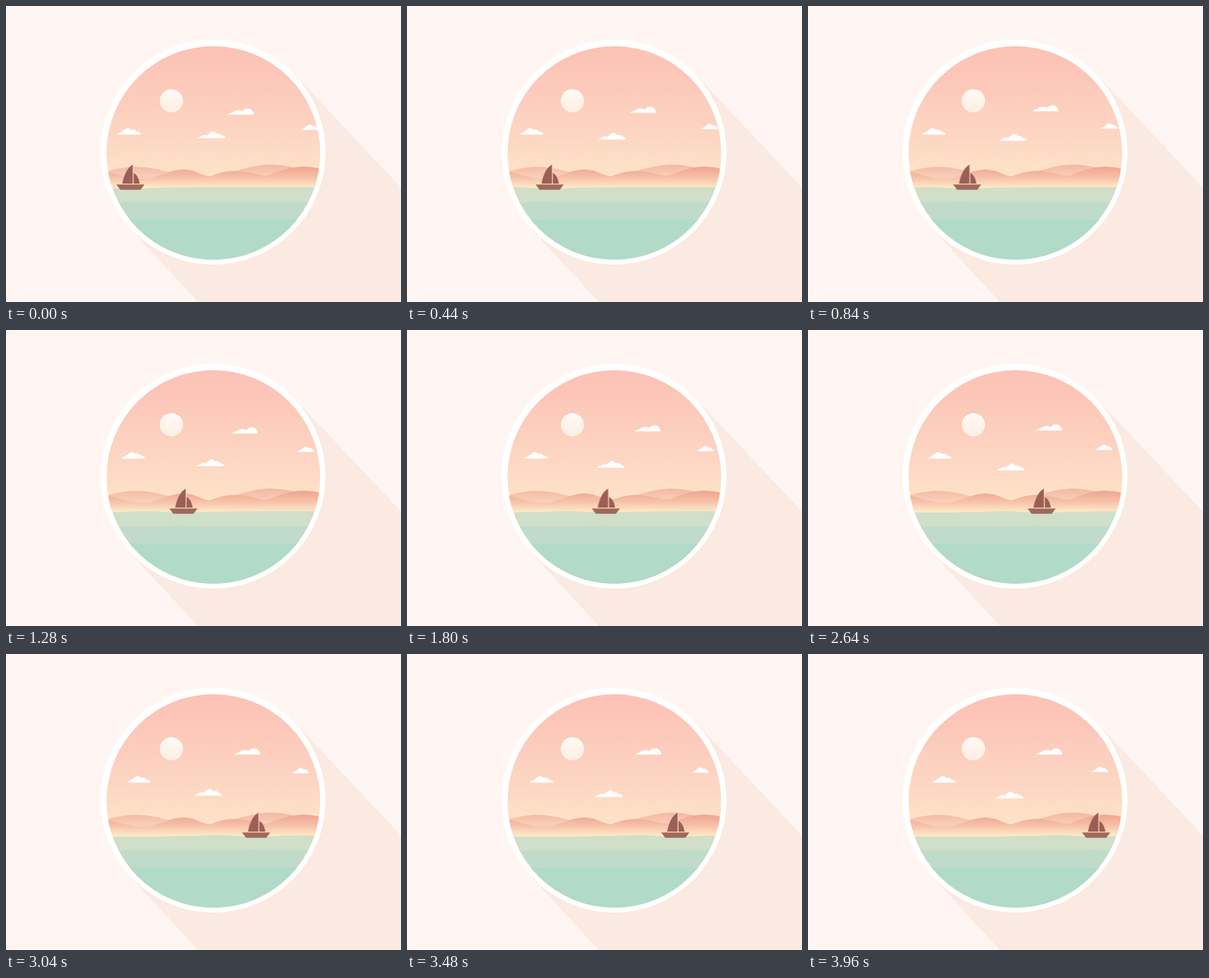
An HTML page without scripts that plays this animation: 560x420 px, repeating every 4 s.

```html
<!DOCTYPE html>
<html lang="en">
<head>
<meta charset="utf-8">
<title>Sailing at sunset</title>
<style>
  html, body { margin: 0; width: 100%; height: 100%; overflow: hidden; background: #fff6f3; }
  svg { display: block; width: 100vw; height: 100vh; }
  .drift { animation: drift 4s linear infinite; }
  .rise { animation-name: rise; }
  .boat, .waves { --x: 234.4px; --y: 0px; }
  .west { --x: 18.6px; --y: 0px; }
  .middle { --x: -6.2px; --y: 17.6px; }
  .high { --x: 9.2px; --y: -11.6px; }
  .east { --x: -17px; --y: -8.4px; }
  @keyframes drift { to { transform: translate(var(--x), var(--y)); } }
  /* the high cloud settles halfway through */
  @keyframes rise { 50%, 100% { transform: translate(var(--x), var(--y)); } }
</style>
</head>
<body>
<svg viewBox="0 0 560 420">
  <defs>
    <linearGradient id="sky" gradientUnits="userSpaceOnUse" x1="0" y1="57" x2="0" y2="258">
      <stop offset="0" stop-color="#fcc2b6"/>
      <stop offset=".2" stop-color="#fcc6b8"/>
      <stop offset=".65" stop-color="#fdd7c3"/>
      <stop offset="1" stop-color="#fee7c9"/>
    </linearGradient>
    <linearGradient id="sun" x2="0" y2="1">
      <stop offset="0" stop-color="#fffaf5"/>
      <stop offset="1" stop-color="#fdeee2"/>
    </linearGradient>
    <linearGradient id="far" gradientUnits="userSpaceOnUse" x1="0" y1="225" x2="0" y2="250">
      <stop offset="0" stop-color="#f4b8a3"/>
      <stop offset="1" stop-color="#fbd8c0"/>
    </linearGradient>
    <linearGradient id="near" gradientUnits="userSpaceOnUse" x1="0" y1="228" x2="0" y2="258">
      <stop offset="0" stop-color="#f0a48f"/>
      <stop offset=".5" stop-color="#f6c0a7"/>
      <stop offset="1" stop-color="#fee9c6"/>
    </linearGradient>
    <clipPath id="port"><circle cx="294" cy="208.5" r="151.5"/></clipPath>
  </defs>

  <rect width="560" height="420" fill="#fff6f3"/>
  <path d="M409 97L560 257.5V420H272L177 317Z" fill="#faeae1"/>
  <circle cx="293.5" cy="207.5" r="159.5" fill="#fff"/>

  <g clip-path="url(#port)">
    <rect x="140" y="50" width="310" height="320" fill="url(#sky)"/>
    <circle cx="234.5" cy="134.5" r="16.5" fill="url(#sun)"/>

    <g fill="url(#far)">
      <path d="M140 236C160 229 180 227 198 229S222 234 232 236V258H140Z"/>
      <path d="M320 236C340 230 356 225 375 225S404 229 420 231V258H320Z"/>
    </g>
    <g fill="url(#near)">
      <path d="M140 234C158 238 174 245 195 245C218 244 230 232 252 232C270 232 278 242 292 242V260H140Z"/>
      <path d="M288 242C300 238 308 234 325 234S352 239 370 241V260H288Z"/>
      <path d="M370 241C384 236 400 228 422 228Q436 228 450 232V260H370Z"/>
    </g>

    <g fill="#fff">
      <path class="drift west" d="M157.5 182.5C159 180 162 180 163.5 179C164 177 167 177.5 168 175.5C170 172.5 175 172.5 177.5 176C181 175 184 176 185.5 178.5C189 178 191 180 191 182.5Z"/>
      <path class="drift middle" d="M272 187.5C274 185 277 185 278.5 184C280 182 284 183 285.5 184C286 181 288 181 289.5 180C291 177 296 177 298 181C302 180 305 181.5 306 183.5C309 183.5 310.500 185 311.500 187.500Z"/>
      <path class="drift rise high" d="M314 154.300C317 151.500 320 151.500 322 150.500C325 147.500 331 147 333.500 149C336 149 337 148 338 146.500C342 144.500 348 145.500 349 149C351 150 351 152 351 154.300Z"/>
      <path class="drift east" d="M418.500 175.700C420 173.500 422 173.500 424 172.500C425 170.500 426 171 427 170C429 167.500 433 168 434.500 170.500C438 169.800 440 171 440.500 173C442 173 442.500 174.500 442.500 175.700Z"/>
    </g>

    <g class="drift waves">
      <path fill="#cfdfc9" d="M-120 259H40Q52 259 62 258.300T85 258.500Q104 257 120 257T150 258.300Q178 259 195 258.800Q206 258.600 214 257.800Q228 258 245 257.400L300 257H460V370H-120Z"/>
      <path fill="#c0dbc9" d="M-120 278.700H140Q150 277.800 159 278.400Q168 277 180 278.500H460V370H-120Z"/>
    </g>
    <rect x="140" y="303" width="310" height="65" fill="#b1dac9"/>

    <g class="drift boat">
      <path d="M180.200 226V253" stroke="#fbdcc5" stroke-width="1.200"/>
      <path fill="#9b5f55" d="M179.600 225V252H164.800C167 241 171 230 179.600 225ZM180.900 237C185.500 239 188.500 245 189.500 252H180.900Z"/>
      <path fill="#a0685b" d="M156.500 253.300H196.200L190.800 260.700H162Z"/>
    </g>
  </g>
</svg>
</body>
</html>
```
